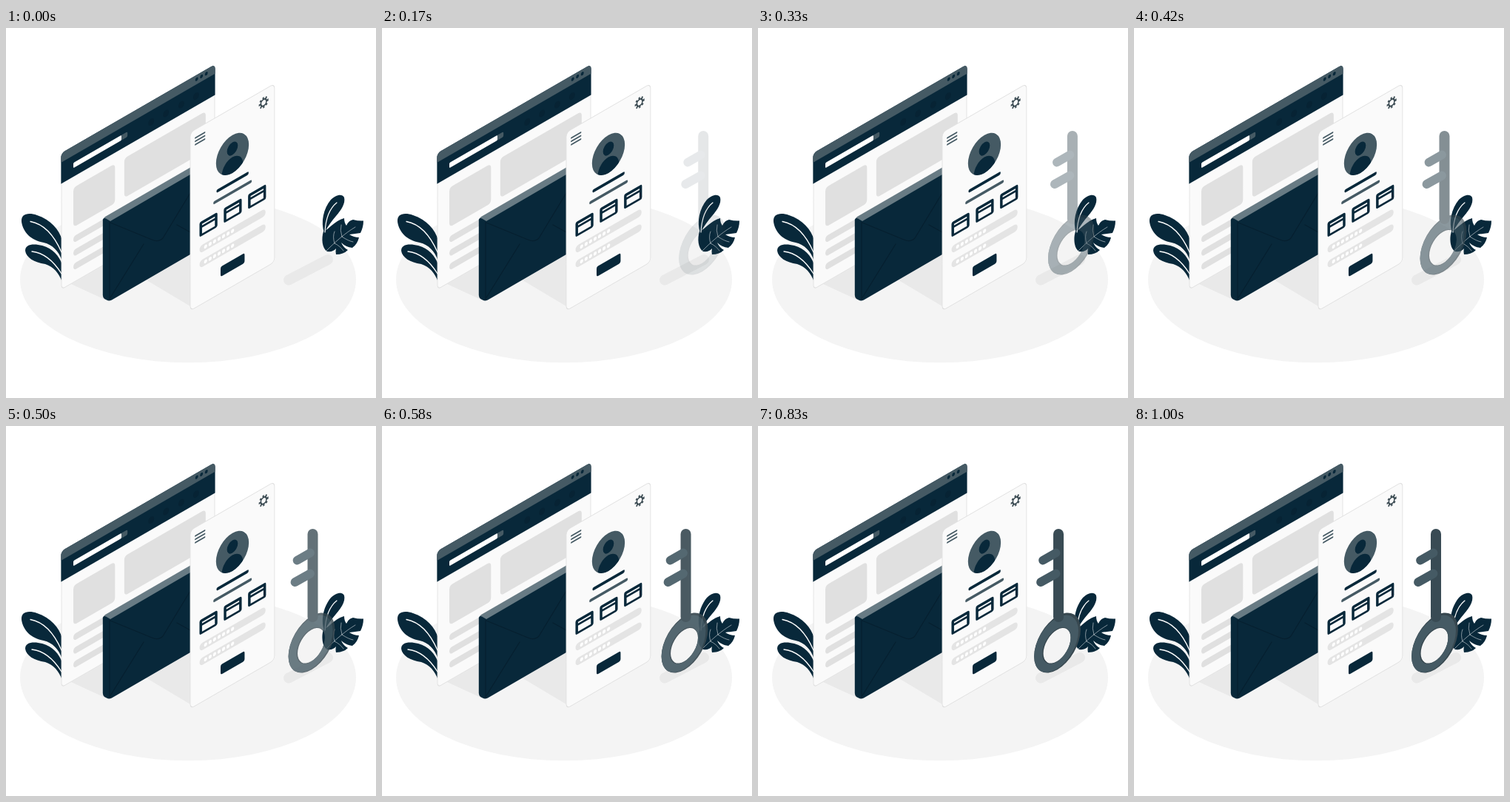
An HTML page that plays this animation: 500 by 500 pixels, repeating every 1040 ms.

```html
<!DOCTYPE html>
<html lang="en">
<head>
<meta charset="utf-8">
<title>Isometric sign-in</title>
<style>
  html, body { margin: 0; width: 100%; height: 100%; overflow: hidden; background: #fff; }
  svg { display: block; width: 100%; height: 100%; }
  .navy { fill: #08283a; }
  .slate { fill: #455a64; }
  .grey { fill: #e0e0e0; }
  .panel { fill: #fafafa; stroke: #e0e0e0; }
  .line { fill: none; stroke-linecap: round; stroke-linejoin: round; }
</style>
</head>
<body>
<svg viewBox="0 0 500 500">
  <defs>
    <clipPath id="avatar"><circle cx="65.8" cy="62.2" r="25.6"/></clipPath>
    <clipPath id="sheet"><rect x="-.8" y="-1.2" width="240.6" height="185" rx="6"/></clipPath>
    <g id="icon">
      <rect class="navy" width="28" height="20" rx="2.5"/>
      <path d="M4 4H24V6H4ZM4 9H24V17H4Z" fill="#fafafa"/>
    </g>
  </defs>

  <ellipse cx="246" cy="340" rx="227" ry="112.3" fill="#f4f4f4"/>
  <g fill="#e9e9e9">
    <path d="M88 346L138 369L249 304V253Z"/>
    <path d="M187 339L249 376V303Z"/>
  </g>
  <path class="line" d="M382 340.5L435 313" stroke="#e9e9e9" stroke-width="14"/>

  <!-- left plant -->
  <g class="navy">
    <path d="M21 262C20 251 30 249 42 253C60 259 72 272 76 287V315C71 301 63 293 51 290C34 287 23 276 21 262Z"/>
    <path d="M26 301C26 292 37 291 49 294C63 298 72 308 76 320V343C71 331 65 323 53 319C38 317 27 310 26 301Z"/>
  </g>
  <g class="line" stroke="#fff" stroke-width="1.3">
    <path d="M33 261.5C52 265 65 280 75 303"/>
    <path d="M35 302C53 304 65 316 75 332"/>
  </g>

  <!-- browser window -->
  <g transform="matrix(.866 -.5 0 1 75 170)">
    <rect class="panel" width="239" height="183" rx="5"/>
    <g clip-path="url(#sheet)">
      <rect class="navy" x="-1" y="-2" width="241" height="42.3"/>
      <rect class="slate" x="-1" y="-2" width="241" height="13.5"/>
    </g>
    <g class="navy"><circle cx="211" cy="4.6" r="2.3"/><circle cx="218.5" cy="4.6" r="2.3"/><circle cx="226" cy="4.6" r="2.3"/></g>
    <g fill="#072334"><circle cx="140" cy="27" r="4.5"/><circle cx="163" cy="27" r="4.5"/><circle cx="187" cy="27" r="4.5"/><circle cx="210" cy="27" r="4.5"/></g>
    <rect class="slate" x="18.5" y="21.5" width="84.5" height="7" rx="2"/>
    <rect x="18.5" y="21.5" width="75" height="7" rx="1.5" fill="#fff"/>
    <g class="grey">
      <rect x="18.5" y="55" width="65" height="53.5" rx="5"/>
      <rect x="98" y="55" width="127" height="53.5" rx="5"/>
    </g>
    <path class="line" d="M23 125.5H80M23 144H80M23 162.5H80" stroke="#e0e0e0" stroke-width="9"/>
  </g>

  <!-- envelope -->
  <path d="M131 260Q131 257 134 255L249 188.5V204L140 264Z" fill="#687b84"/>
  <path class="navy" d="M130.8 259Q132 256 135 257.5L141 261L249 198V306L143 367.5Q139 369.5 136 367.5L133 366Q130.8 364 130.8 361Z"/>
  <path class="line" d="M140 262V367M141 263L197 286Q206 290 212 284L249 223M140 366L186 292M231 266L249 276" stroke="#061f2f" stroke-width="1.2"/>

  <!-- profile card -->
  <g transform="matrix(.866 -.5 0 1 249 141)">
    <rect class="panel" width="131.5" height="241" rx="6"/>
    <path class="line" d="M8 11.5H22.5M8 16H22.5M8 20.5H22.5" stroke="#455a64" stroke-width="2"/>
    <g fill="none" stroke="#37474f" transform="translate(114.5 17) rotate(-11.25)">
      <circle r="4.4" stroke-width="2"/>
      <circle r="6.2" stroke-width="2.6" pathLength="16" stroke-dasharray="1"/>
    </g>
    <circle class="slate" cx="65.8" cy="62.2" r="25.6"/>
    <g class="navy" clip-path="url(#avatar)">
      <circle cx="65.8" cy="55" r="8.5"/>
      <circle cx="65.8" cy="83" r="16.5"/>
    </g>
    <path class="line" d="M43 100.3H89" stroke="#08283a" stroke-width="4.2"/>
    <path class="line" d="M38 113.8H94" stroke="#455a64" stroke-width="4"/>
    <use href="#icon" x="14.4" y="129"/>
    <use href="#icon" x="52.3" y="129"/>
    <use href="#icon" x="90.2" y="129"/>
    <path class="line" d="M19.5 166.3H112.5M19.5 186.3H112.5" stroke="#e4e4e4" stroke-width="10"/>
    <path class="line" d="M24 166.3H67M24 186.3H67" stroke="#fff" stroke-width="5" stroke-dasharray="0 7"/>
    <rect class="navy" x="47.3" y="205.3" width="37.5" height="13.5" rx="2.5"/>
  </g>

  <!-- right plant -->
  <g class="navy">
    <path d="M430 277C425 262 429 244 439 232C445 226 454 223 457 229C459 237 453 246 446 254C440 261 435 268 430 277Z"/>
    <path d="M429 275C438 271 443 261 457 257Q457 263 460 267Q463 260 469 259Q476 261 483 260.5Q483 269 479 277Q472 278 464 279Q470 283 477 283Q475 292 468 297Q459 296 453 290Q456 297 462 300Q456 306 446 306Q445 302 446 298Q442 303 434 302C427 298 426 284 429 275Z"/>
  </g>
  <g class="line" stroke="#fff">
    <path d="M447 236C437 244 432 256 431 276" stroke-width="1.2"/>
    <path d="M433 301C444 290 457 278 472 269M444 291Q441 282 444 275M454 282Q451 273 453 266M444 291Q452 295 456 301M454 282Q463 288 469 289" stroke-width=".5"/>
  </g>

  <g id="key" opacity="0">
    <g transform="matrix(.866 -.5 0 1 406.5 293)" fill-rule="evenodd">
      <path d="M-36.3 0a36.3 36.3 0 1 0 72.6 0a36.3 36.3 0 1 0-72.6 0ZM-21.9 3.5a21.3 21.3 0 1 0 42.6 0a21.3 21.3 0 1 0-42.6 0Z" fill="#37474f"/>
      <path class="slate" d="M-36.3 .4a34.6 34.6 0 1 0 69.2 0a34.6 34.6 0 1 0-69.2 0ZM-23.6 3a22.2 22.2 0 1 0 44.4 0a22.2 22.2 0 1 0-44.4 0Z"/>
    </g>
    <g class="line">
      <path d="M408 146V258" stroke="#394b54" stroke-width="14"/>
      <path d="M387 181.5L404.5 171.5M384 211L404.5 199.5" stroke="#455a64" stroke-width="11.8"/>
    </g>
  </g>
</svg>
<script>
  const LOOP = 1040, FPS = 24, SLIDE = 30;
  const key = document.getElementById('key');

  const bezier = (a, b, s) => 3 * a * s * (1 - s) ** 2 + 3 * b * s * s * (1 - s) + s ** 3;

  // cubic-bezier(.36, -.01, .5, 1.38): slides in and overshoots
  function ease(p) {
    let lo = 0, hi = 1;
    for (let i = 0; i < 24; i++) {
      const mid = (lo + hi) / 2;
      if (bezier(.36, .5, mid) < p) lo = mid; else hi = mid;
    }
    return bezier(-.01, 1.38, hi);
  }

  function draw(now) {
    const step = Math.floor((now % LOOP + 5) * FPS / 1000);
    const e = step < 2 ? 0 : ease(Math.min(1, (step + .5) / FPS));
    key.setAttribute('transform', `translate(${SLIDE * (1 - e)} 0)`);
    key.setAttribute('opacity', Math.max(0, Math.min(1, e)));
    requestAnimationFrame(draw);
  }
  requestAnimationFrame(draw);
</script>
</body>
</html>
```
